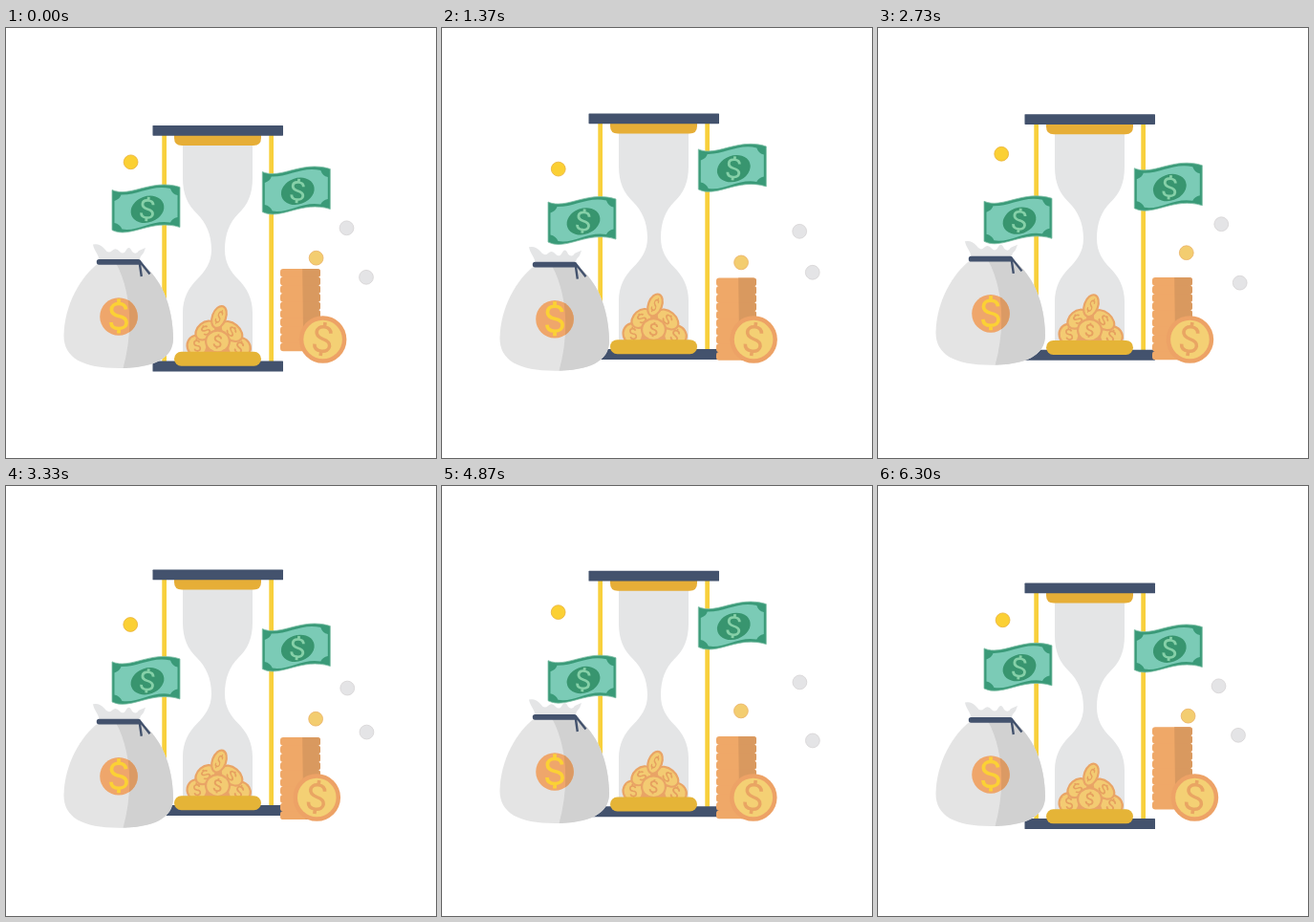
Animation, 450 px wide and 450 px high, one loop 6330 ms. Source, as an HTML page:

```html
<!DOCTYPE html>
<html lang="en">
<head>
<meta charset="utf-8">
<title>Time is money</title>
<style>
  html, body { margin: 0; width: 100%; height: 100%; overflow: hidden; background: #fff; }
  svg { display: block; width: 100vw; height: 100vh; }
  .sign { fill: none; stroke-linecap: butt; }
  .navy { fill: #43526d; }
  .pale { fill: #e4e5e6; }
</style>
</head>
<body>
<svg viewBox="0 0 450 450">
  <defs>
    <path id="dollar" class="sign" d="M7-7C6.6-11 4-13 0-13C-4.500-13-7-10.500-7-6.800C-7-2.500-4-1 0 0C4.500 1 7.500 2.500 7.500 6.700C7.500 10.500 4.500 13 0 13C-4.500 13-7.300 10.700-7.500 6.500M0-13V-18M0 13V18"/>
    <g id="note">
      <path fill="#3a9a78" stroke="#7fbfa6" stroke-width=".8" d="M111 169.500C130 178 152 157 182 166.500V208.500C152 199 130 221 111 211.500Z"/>
      <path fill="#7bcbb6" d="M113.500 181Q119 179 120.500 174.500C138 175 153 163.500 172 168Q174 174 179.500 175V198Q174 199 172 203.500C153 200 138 213.500 121.500 210.500Q119 205 113.500 204Z"/>
      <ellipse cx="148" cy="189.800" rx="17.800" ry="13.600" transform="rotate(-20 148 189.800)" fill="#38956f"/>
      <use href="#dollar" transform="translate(148 189.500) rotate(6) scale(.8 .7)" stroke="#86d0a8" stroke-width="3.600"/>
    </g>
    <clipPath id="shadeSide"><path d="M310 240H340V350H310Q317 336 311 318Z"/></clipPath>
    <clipPath id="bagShape">
      <path id="bagBody" d="M97 246C78 260 61 290 60.500 322C60.500 345 80 356 118 356C154 356 175 346 175 325C174.500 290 162 261 141 246Z"/>
    </clipPath>
    <clipPath id="badgeShape"><circle id="badge" cx="118" cy="302" r="19.800"/></clipPath>
    <path id="bagShade" d="M115 246C132 277 133 320 122 358H180V246Z"/>
  </defs>

  <g id="glass">
    <path fill="#f8d03c" d="M163.300 111H168V349H163.300ZM275.300 111H280V349H275.300Z"/>
    <path class="pale" d="M185 112V157C185 174 190 185 200 194.500C209 203 215 216 215 232C215 246 208 255 200 263C191 272 185 283 185 298V342H258V298C258 283 252 272 243 263C235 255 229 246 229 232C229 216 234 203 243 194.500C253 185 258 174 258 157V112Z"/>
    <ellipse cx="222" cy="328" rx="26" ry="17" fill="#e9a466"/>
    <g id="pile"></g>
    <path fill="#e6ae37" d="M176 112H267V115Q267 123 259 123H184Q176 123 176 115Z"/>
    <rect class="navy" x="153.500" y="102" width="136.500" height="10.700" rx=".6"/>
    <rect class="navy" x="153.500" y="348.500" width="136.500" height="11" rx=".6"/>
    <rect x="176" y="338.700" width="91" height="15" rx="7.500" fill="#e5b437"/>
  </g>

  <g id="stack">
    <g id="rows" fill="#efa868"></g>
    <g clip-path="url(#shadeSide)"><use href="#rows" style="filter:brightness(.91)"/></g>
  </g>

  <g id="coin">
    <circle cx="331.600" cy="326" r="24.800" fill="#eda266"/>
    <circle cx="331.600" cy="326" r="20.300" fill="#f4d074"/>
    <use href="#dollar" transform="translate(331.600 325.500) rotate(8) scale(1.060 .98)" stroke="#e9a563" stroke-width="3.400"/>
  </g>

  <g id="bag">
    <path class="pale" d="M98 244C97 237 92 233 91 226.500Q98 225 103 231Q107 237 111 233Q115 229 119 234Q123 238 126 232Q129 227 132 234Q136 238 139 233L146 230Q145 235 141 239L139 244Z"/>
    <use href="#bagBody" fill="#e4e4e4"/>
    <use href="#bagShade" clip-path="url(#bagShape)" fill="#d1d1d1"/>
    <path d="M139.500 243.500L150.500 257.500M139.500 244L141.800 260" fill="none" stroke="#43526d" stroke-width="2.400"/>
    <rect class="navy" x="94.800" y="242" width="46.200" height="5.700" rx="2.600"/>
    <use href="#badge" fill="#efa66b"/>
    <use href="#bagShade" clip-path="url(#badgeShape)" fill="#db9a64"/>
    <use href="#dollar" transform="translate(118 301.500) scale(1.080 1)" stroke="#fbd135" stroke-width="3.500"/>
  </g>

  <g id="noteL"><use href="#note"/></g>
  <g id="noteR"><use href="#note" x="157.300" y="-19"/></g>
  <g id="dots"></g>
</svg>
<script>
const LOOP = 6330, FRAME = 100 / 3, FRAMES = 190;
const $ = id => document.getElementById(id);

function add(parent, tag, attrs) {
  const el = document.createElementNS("http://www.w3.org/2000/svg", tag);
  for (const k in attrs) el.setAttribute(k, attrs[k]);
  return parent.appendChild(el);
}

// x, y, rx, ry, tilt of each coin under the glass
[
  [200, 332.500, 11.500, 12, -15],
  [244, 334.500, 13, 12, 15],
  [236, 317.500, 14, 9.500, 40],
  [209, 316.500, 13, 9.500, -40],
  [221.500, 328, 13.500, 12.500, 0],
  [223, 302.500, 8.200, 13, 20]
].forEach(([x, y, rx, ry, tilt]) => {
  const g = add($("pile"), "g", { transform: `translate(${x} ${y}) rotate(${tilt})` });
  add(g, "ellipse", { rx, ry, fill: "#e9a466" });
  add(g, "ellipse", { rx: rx - 2.2, ry: ry - 2.2, fill: "#f3cb72" });
  add(g, "use", {
    href: "#dollar", stroke: "#e6a05f", "stroke-width": 4,
    transform: `rotate(8) scale(${rx / 29} ${ry / 29})`
  });
});

add($("rows"), "rect", { x: 289.5, y: 253, width: 37, height: 84 });
for (let i = 0; i < 10; i++)
  add($("rows"), "rect", { x: 287, y: 252 + i * 8.6, width: 42, height: 8.8, rx: 3.2 });

// centre, swing and colours of the floating dots
const dots = [
  [126, 140.300, 4.6, -9, "#fbd034", "#e9b13c"],
  [318.600, 240.700, 6, -5.800, "#f3cd70", "#eab266"],
  [365.700, 209.300, -9.200, -4.300, "#e4e4e6", "#d6d4d5"],
  [382.600, 260.800, -5.600, 6.200, "#e4e4e6", "#d6d4d5"]
].map(([x, y, ax, ay, fill, stroke]) => ({
  x, y, ax, ay,
  el: add($("dots"), "circle", { r: 7.4, fill, stroke, "stroke-width": 0.8 })
}));

const move = (id, x, y) => $(id).setAttribute("transform", `translate(${x} ${y})`);

// periods are counted in frames
function pose(n) {
  const turn = 2 * Math.PI * n;
  const lift = 1 - Math.cos(turn / 62);
  const slow = Math.cos(turn / 94);
  const sway = Math.sin(turn / 63);
  move("glass", 0, -8.2 * lift);
  move("noteL", 0, 8.2 * lift);
  move("stack", 0, 6.2 * lift);
  move("coin", -3.6 * lift, 0);
  move("noteR", 0, 12.3 * (slow - 1));
  move("bag", 0, -3.3 * sway);
  for (const d of dots) {
    d.el.setAttribute("cx", d.x + d.ax * slow);
    d.el.setAttribute("cy", d.y + d.ay * sway);
  }
}

const start = performance.now();
function tick() {
  const t = (performance.now() - start) % LOOP;
  pose(Math.min(FRAMES - 1, Math.floor((t + 5) / FRAME)));
  requestAnimationFrame(tick);
}
pose(0);
requestAnimationFrame(tick);
</script>
</body>
</html>
```
